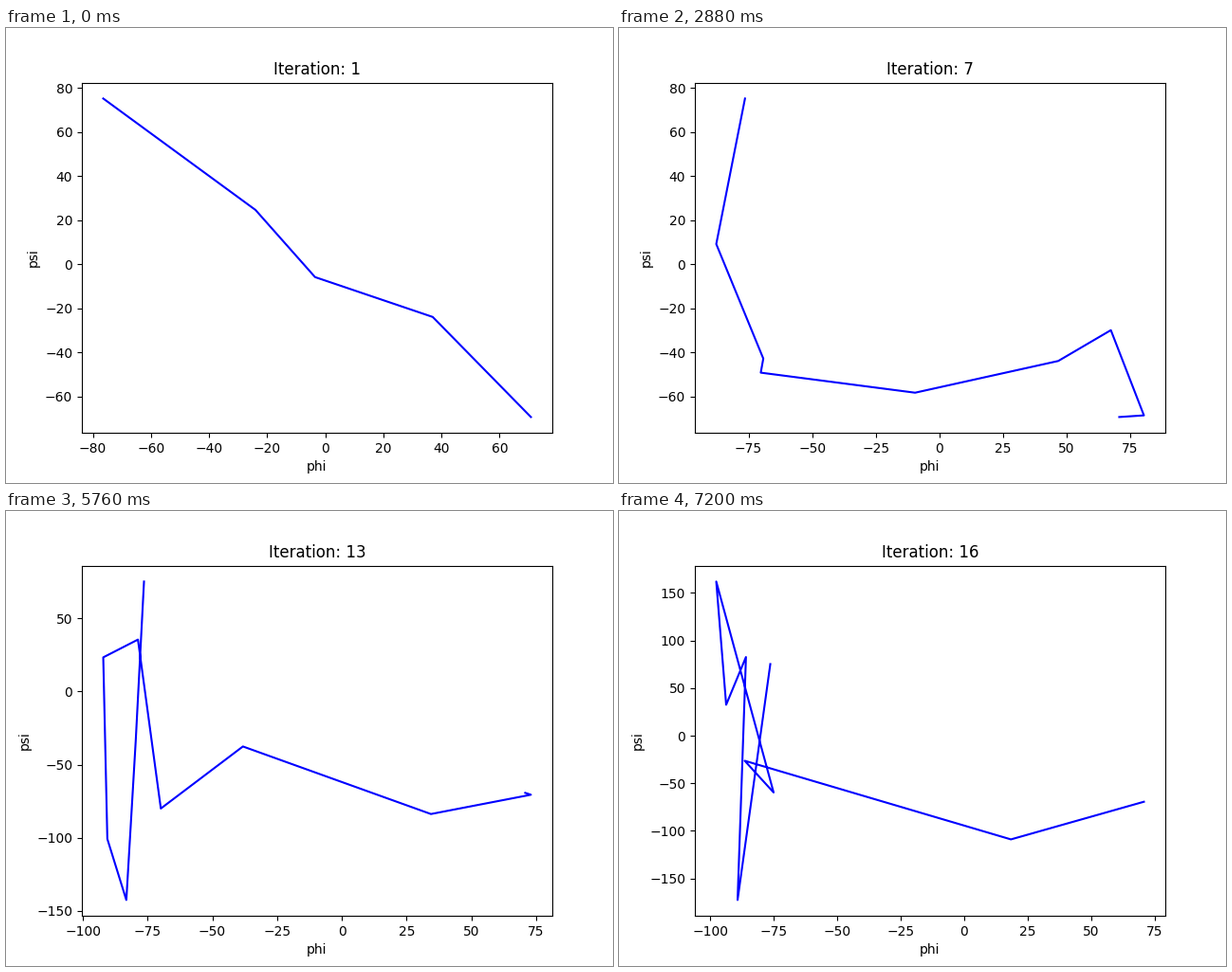
A matplotlib script that plays this animation: 640x480 px, repeating every 7.68 s.

```python
import numpy as np
import matplotlib.pyplot as plt
from matplotlib.animation import FuncAnimation

ITERATIONS = 16
NODE_COUNT = 11
START, END = (-76.4, 75.3), (70.8, -69.35)

# Corners (phi, psi) of the string at key iterations, without its fixed ends
CORNERS = {
    1: [(-24.0, 24.7), (-3.5, -5.8), (37.0, -23.9)],
    5: [(-81.2, 29.9), (-88.3, 43.2), (-87.7, 17.2), (-53.9, -33.1),
        (-54.4, -41.1), (-9.3, -53.3), (67.1, -34.2), (74.1, -41.5)],
    7: [(-87.7, 9.2), (-69.2, -42.8), (-70.2, -49.2), (-9.5, -58.3),
        (46.8, -43.9), (67.5, -29.9), (80.5, -68.6)],
    9: [(-82.3, 14.6), (-71.1, -41.1), (-69.3, -30.8), (-52.5, -66.2),
        (86.5, -53.5), (75.4, -43.0), (76.6, -48.8), (95.5, -60.2)],
    11: [(-88.6, -105.9), (-92.6, 4.6), (-68.7, -68.1), (-38.5, -44.4),
         (45.0, -105.2), (70.9, -44.7), (77.4, -52.5)],
    14: [(-80.9, -161.1), (-90.6, -126.0), (-91.9, 32.8), (-84.3, 87.4),
         (-86.5, -97.9), (-82.0, -3.8), (11.0, -103.4), (64.1, -79.7)],
    16: [(-89.3, -172.6), (-86.0, 82.7), (-93.8, 32.5), (-97.7, 162.0),
         (-75.1, -59.6), (-86.5, -26.3), (18.4, -108.9)],
}


def key_string(iteration):
    """Halve the longest segment until the string has all its nodes."""
    nodes = np.array([START, *CORNERS[iteration], END])
    while len(nodes) < NODE_COUNT:
        i = np.linalg.norm(np.diff(nodes, axis=0), axis=1).argmax()
        nodes = np.insert(nodes, i + 1, (nodes[i] + nodes[i + 1]) / 2, axis=0)
    return nodes


def string_at(iteration):
    """Blend neighbouring key strings, keeping the blended width in phi."""
    if iteration in CORNERS:
        return key_string(iteration)
    before = max(k for k in CORNERS if k < iteration)
    after = min(k for k in CORNERS if k > iteration)
    t = (iteration - before) / (after - before)
    a, b = key_string(before), key_string(after)
    nodes = (1 - t) * a + t * b
    phi = nodes[1:-1, 0]
    width = [(1 - t) * f(a[:, 0]) + t * f(b[:, 0]) for f in (np.min, np.max)]
    phi[:] = np.interp(phi, [phi.min(), phi.max()], width)
    return nodes


fig, ax = plt.subplots(figsize=(6.4, 4.8), dpi=100)


def draw(frame):
    ax.clear()
    phi, psi = string_at(frame + 1).T
    ax.plot(phi, psi, color="blue", linewidth=1.5)
    ax.set_xlabel("phi")
    ax.set_ylabel("psi")
    ax.set_title(f"Iteration: {frame + 1}")


anim = FuncAnimation(fig, draw, frames=ITERATIONS, init_func=lambda: None,
                     interval=480, repeat=True, repeat_delay=0)
plt.show()
```
